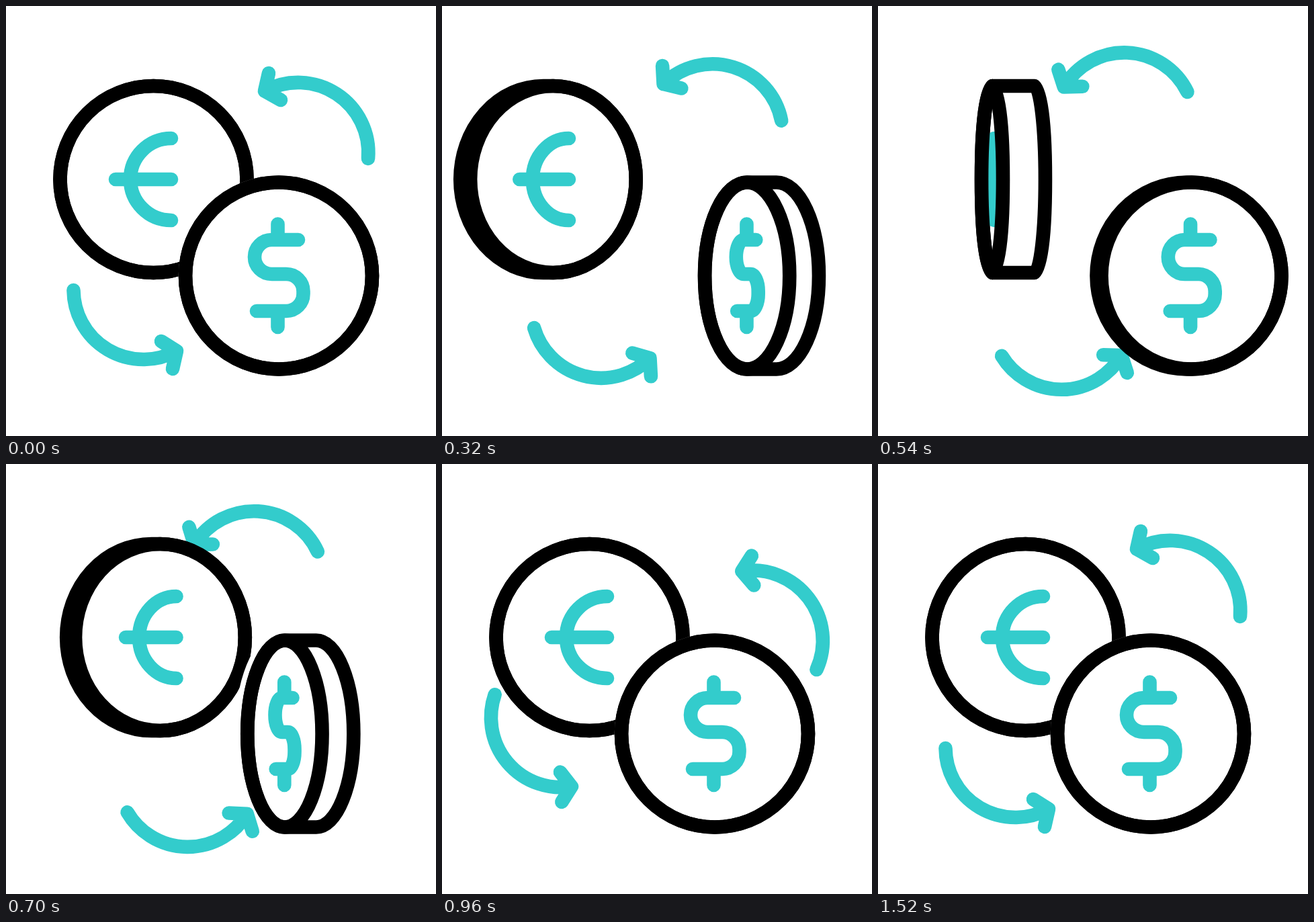
Write an HTML page with a canvas that moves like this. It is 640 px wide and 640 px high and loops after 2.4 s.

```html
<!DOCTYPE html>
<html lang="en">
<head>
<meta charset="utf-8">
<title>Currency exchange</title>
<style>
  html, body { margin: 0; width: 100%; height: 100%; overflow: hidden; background: #fff; }
  canvas { display: block; }
</style>
</head>
<body>
<canvas id="stage" width="640" height="640"></canvas>
<script>
const ctx = document.getElementById('stage').getContext('2d');
const LOOP = 2400, STEP = 20, RADIUS = 139, THICKNESS = 69.5;
const TEAL = '#33cccc';

// Symbols are drawn relative to the centre of their coin.
const euro = new Path2D('M26.5 -61A61 61 0 0 0 26.5 61M-56.5 0H26.5');
const dollar = new Path2D('M29 -53.5H-10.5A25.5 25.5 0 0 0 -10.5 -2.5H11A25.5 25.5 0 0 1 36.5 23V27' +
  'A25.5 25.5 0 0 1 11 52.5H-33M-1.5 -77V-53.5M-1.5 52.5V76.5');
const upperArrow = new Path2D('M539 227A104.5 104.5 0 0 0 385 126.5M391 100L385 126.5L409 140');
const lowerArrow = new Path2D('M100.5 423A104 104 0 0 0 254 513.5M231 499L254 513.5L248 540');

const euroCoin = {
  x: 219.5, y: 258, symbol: euro,
  turn: [[0, 0], [320, 152.5], [540, 263.4], [700, 335.4], [755, 360]],
  shift: [[0, 0], [190, -42], [320, -61.5], [380, -68], [540, -18], [700, 3.5], [755, 0]]
};
const dollarCoin = {
  x: 406, y: 401.5, symbol: dollar,
  turn: [[185, 0], [320, 63], [540, 164.6], [700, 246.4], [945, 360]],
  shift: [[0, 0], [190, 38], [320, 70], [400, 71], [540, 57], [700, 32.3], [945, 0]]
};
const swing = [[0, 0], [637, -34], [1014, 22.8], [1346, -12.5], [1520, 0]];

const smooth = u => u * u * (3 - 2 * u);

function segment(keys, t, blend) {
  if (t <= keys[0][0]) return keys[0][1];
  for (let i = 1; i < keys.length; i++) {
    const [t0, v0] = keys[i - 1], [t1, v1] = keys[i];
    if (t < t1) return blend((t - t0) / (t1 - t0), v0, v1, i);
  }
  return keys[keys.length - 1][1];
}

const linear = (keys, t) => segment(keys, t, (u, a, b) => a + (b - a) * u);

function spline(keys, t) {
  const slope = i => {
    const a = keys[i - 1], b = keys[i + 1];
    return a && b ? (b[1] - a[1]) / (b[0] - a[0]) : 0;
  };
  return segment(keys, t, (u, a, b, i) => {
    const span = keys[i][0] - keys[i - 1][0], v = 1 - u;
    return a + (b - a) * smooth(u) + span * u * v * (slope(i - 1) * v - slope(i) * u);
  });
}

// The first swing still has some speed when it turns around.
const swingAngle = t => segment(swing, t, (u, a, b, i) =>
  a + (b - a) * (smooth(u) - (i === 1 ? 0.29 * u * u * (1 - u) : 0)));

function pose(coin, t) {
  const a = linear(coin.turn, t) * Math.PI / 180;
  const s = Math.sin(a), c = Math.cos(a);
  const tilt = Math.atan2(Math.abs(s), Math.abs(c)) / (Math.PI / 2);
  return {
    x: coin.x + spline(coin.shift, t),
    y: coin.y,
    scale: Math.max(Math.abs(c), 0.001),
    depth: THICKNESS * tilt ** 1.3 * Math.sign(s * c)
  };
}

function paint(path, stroke, fill) {
  if (fill) {
    ctx.fillStyle = fill;
    ctx.fill(path);
  }
  ctx.strokeStyle = stroke;
  ctx.stroke(path);
}

function bodyPath({ x, y, scale, depth }) {
  const p = new Path2D(), rx = RADIUS * scale, half = Math.abs(depth) / 2;
  p.ellipse(x + half, y, rx, RADIUS, 0, -Math.PI / 2, Math.PI / 2);
  p.ellipse(x - half, y, rx, RADIUS, 0, Math.PI / 2, Math.PI * 1.5);
  p.closePath();
  return p;
}

function drawCoin(coin, at) {
  const faceX = at.x - at.depth / 2;
  const face = new Path2D(), symbol = new Path2D();
  face.ellipse(faceX, at.y, RADIUS * at.scale, RADIUS, 0, 0, 2 * Math.PI);
  symbol.addPath(coin.symbol, new DOMMatrix([at.scale, 0, 0, 1, faceX, at.y]));
  paint(bodyPath(at), '#000', '#fff');
  paint(symbol, TEAL);
  paint(face, '#000');
}

function drawArrow(path, degrees) {
  ctx.save();
  ctx.translate(320, 320);
  ctx.rotate(degrees * Math.PI / 180);
  ctx.translate(-320, -320);
  paint(path, TEAL);
  ctx.restore();
}

function draw(t) {
  ctx.fillStyle = '#fff';
  ctx.fillRect(0, 0, 640, 640);
  ctx.lineWidth = 20.6;
  ctx.lineCap = ctx.lineJoin = 'round';
  const angle = swingAngle(t), front = pose(dollarCoin, t);
  drawArrow(upperArrow, angle);
  drawCoin(euroCoin, pose(euroCoin, t));
  // White gap left of the front coin while it turns.
  const gap = 12 * Math.abs(front.depth) / THICKNESS;
  paint(bodyPath({ ...front, x: front.x - gap }), '#fff', '#fff');
  drawArrow(lowerArrow, angle);
  drawCoin(dollarCoin, front);
}

function tick() {
  const t = performance.now() % LOOP;
  draw(Math.floor(t / STEP) * STEP);
  requestAnimationFrame(tick);
}
tick();
</script>
</body>
</html>
```
